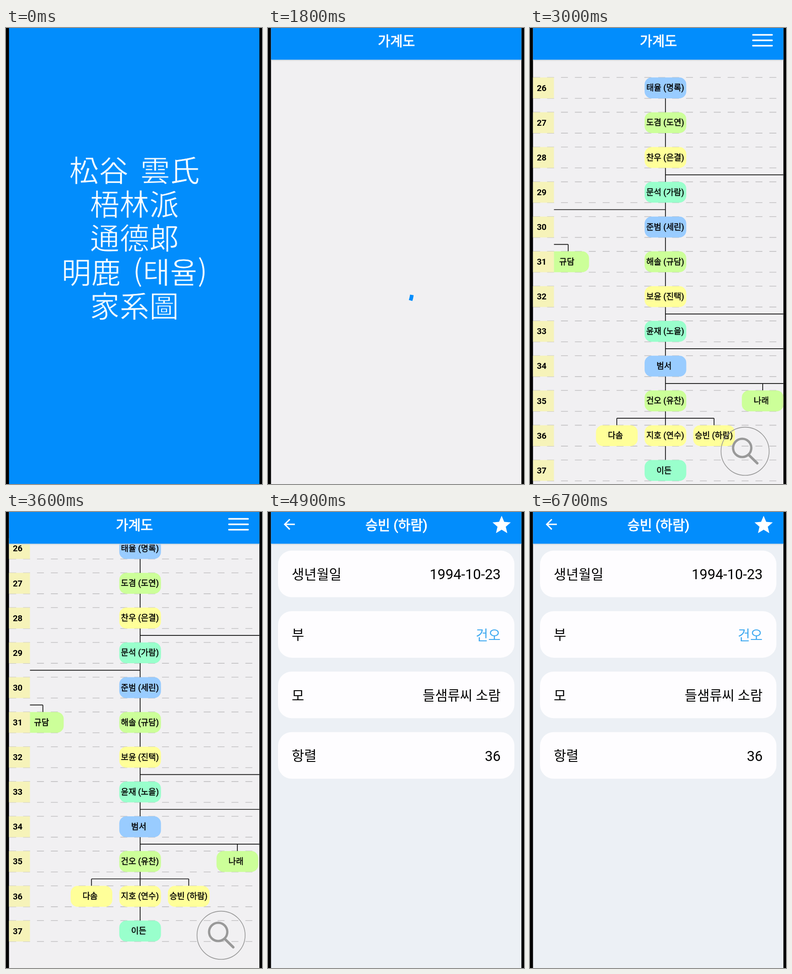
These frames come from a looping animation (561 by 998 pixels, 6.8 s). An HTML page:

```html
<!DOCTYPE html>
<html lang="ko">
<head>
<meta charset="utf-8">
<title>가계도</title>
<style>
html, body { margin: 0; width: 100%; height: 100%; overflow: hidden; background: #000; }
svg { display: block; width: 100vw; height: 100vh; }
text { font-family: Roboto, "Noto Sans CJK KR", "Noto Sans CJK", sans-serif; white-space: pre; }
.mid { text-anchor: middle; }
.end { text-anchor: end; }
/* Strokes tune the weight: background colour thins, text colour thickens */
.splash { font: 300 65px "Noto Sans CJK KR", "Noto Sans CJK", sans-serif; word-spacing: 8px;
  fill: #f6fcff; stroke: #028dfc; stroke-width: 0.9px; }
.bar { font-size: 29.5px; fill: #fff; stroke: #fff; stroke-width: 0.9px; }
.name { font-size: 18px; stroke: #000; stroke-width: 0.45px; }
.gen { font-size: 18.5px; font-weight: 700; }
.field { font-size: 29.6px; }
.num { font-size: 30.8px; }
</style>
</head>
<body>
<svg id="stage" viewBox="0 0 561 998" preserveAspectRatio="none"></svg>
<script>
const LOOP = 6800, BLUE = '#028dfc';
const DP = 548 / 360, ROW = 50 * DP, BOX_W = 60 * DP, BOX_H = 30 * DP, COL = 70 * DP;
const TOP = 108.3, CENTER = 296.8;
const FILLS = ['#99ccff', '#ccff99', '#ffff99', '#99ffcc'];

const rect = (x, y, w, h, fill, r = 0) =>
  `<rect x="${x}" y="${y}" width="${w}" height="${h}" rx="${r}" fill="${fill}"/>`;
const text = (x, y, str, cls, fill) =>
  `<text x="${x}" y="${y}" class="${cls}"${fill ? ` fill="${fill}"` : ''}>${str}</text>`;
const rowY = i => TOP + i * ROW;
const colX = c => CENTER + c * COL;

const header = title => rect(6, 69, 550, 4, 'url(#shadow)') +
  rect(6, -20, 550, 89.4, BLUE) + text(281.5, 38.5, title, 'bar mid');

// Each entry: generation index, column, label
const people = [
  [0, 0, '태율 (명록)'], [1, 0, '도겸 (도연)'], [2, 0, '찬우 (은결)'], [3, 0, '문석 (가람)'],
  [4, 0, '준범 (세린)'], [5, 0, '해솔 (규담)'], [6, 0, '보윤 (진택)'], [7, 0, '윤재 (노을)'],
  [8, 0, '범서'], [9, 0, '건오 (유찬)'], [10, 0, '지호 (연수)'], [11, 0, '이든'],
  [5, -2, '규담'], [9, 2, '나래'], [10, -1, '다솜'], [10, 1, '승빈 (하람)']
];
// Horizontal branches: generation above, first column, last column
const branches = [[2, 0, 4], [3, -4, 0], [4, -4, -2], [6, 0, 4], [7, 0, 4], [8, 0, 4], [9, -1, 1]];

function person([gen, col, label]) {
  const x = colX(col), y = rowY(gen);
  return rect(x - BOX_W / 2, y, BOX_W, BOX_H, FILLS[gen % 4], 10 * DP) +
    text(x - (label.length > 2 ? 0.5 : 3), y + 29, label, 'name mid');
}

function treeLines() {
  let d = `M${CENTER} ${rowY(0) + BOX_H}V${rowY(11)}`;
  for (const [gen, from, to] of branches)
    d += `M${colX(from)} ${rowY(gen + 1) - 10 * DP}H${colX(to)}`;
  for (const [gen, col] of people)
    if (col) d += `M${colX(col)} ${rowY(gen) - 10 * DP}V${rowY(gen)}`;
  return `<path d="${d}" fill="none" stroke="#111" stroke-width="1.7"/>`;
}

function dashes() {
  let d = '';
  for (let i = 0; i < 12; i++)
    for (const y of [rowY(i), rowY(i) + BOX_H]) d += `M7 ${y}H555`;
  return `<path d="${d}" stroke="#c3c2c4" stroke-width="1.6" stroke-dasharray="${10 * DP}"/>`;
}

const generations = Array.from({ length: 12 }, (_, i) =>
  rect(6, rowY(i), 46.5, BOX_H, '#f6f3b9') + text(15, rowY(i) + 29.3, 26 + i, 'gen')).join('');

const searchButton = `<g fill="none" stroke="#999">
  <circle cx="471.3" cy="926.3" r="52.7" stroke-width="1.6"/>
  <circle cx="465" cy="919" r="20" stroke-width="5"/>
  <path d="M479 934L498 952.5" stroke-width="5.5" stroke-linecap="round"/></g>`;
const menuIcon = `<path d="M488.5 15H530.5M488.5 27H530.5M488.5 38.7H530.5"
  stroke="#fff" stroke-width="3.4" stroke-linecap="round"/>`;
const backIcon = `<path transform="translate(28.4 8.8) scale(1.523)" fill="#fff"
  d="M20 11H7.83l5.59-5.59L12 4l-8 8 8 8 1.41-1.41L7.83 13H20z"/>`;
const starIcon = `<path transform="translate(488 4.2) scale(2)" fill="#fff"
  d="M12 17.27 18.18 21l-1.64-7.03L22 9.24l-7.19-.61L12 2 9.19 8.63 2 9.24l5.46 4.73L5.82 21z"/>`;

const fields = [['생년월일', '1994-10-23'], ['부', '건오', '#3fa9f0'], ['모', '들샘류씨 소람'], ['항렬', '36']];
const cards = fields.map(([label, value, color], i) => {
  const y = 84.5 + i * 132.4;
  return rect(22, y, 518, 102, '#fefdff', 30) + text(52, y + 62.5, label, 'field') +
    text(509.8, y + 62.8, value, (/\d/.test(value) ? 'num' : 'field') + ' end', color);
}).join('');

const splashLines = ['松谷 雲氏', '梧林派', '通德郞', '明鹿 (태율)', '家系圖'];

document.getElementById('stage').innerHTML = `
<defs>
  <linearGradient id="shadow" x2="0" y2="1">
    <stop stop-color="#cfd3d7"/><stop offset="1" stop-color="#cfd3d7" stop-opacity="0"/>
  </linearGradient>
  <clipPath id="screen"><rect x="6.6" width="548.7" height="998"/></clipPath>
  <clipPath id="chart"><rect x="52.5" width="510" height="1100"/></clipPath>
  <clipPath id="reveal"><rect id="revealBox" x="6" width="550" height="1200"/></clipPath>
</defs>
<rect width="561" height="998"/>
<g clip-path="url(#screen)">
  <g id="splash">${rect(6, 0, 550, 998, BLUE)}
    ${splashLines.map((s, i) => text(281.5, 336 + i * 74.2, s, 'splash mid')).join('')}</g>
  <g id="home">
    ${rect(6, -30, 550, 1080, '#f1f0f2')}
    <path id="spinner" fill="none" stroke="${BLUE}" stroke-width="8" stroke-linecap="square"/>
    <g id="tree">
      <g id="genColumn">${dashes()}${generations}</g>
      <g clip-path="url(#chart)"><g id="chartBody">${treeLines()}${people.map(person).join('')}</g></g>
      ${searchButton}
    </g>
    ${header('가계도')}
    <g id="menu">${menuIcon}</g>
  </g>
  <rect id="dim" x="6" width="550" height="998"/>
  <g clip-path="url(#reveal)"><g id="detail">
    ${rect(6, 0, 550, 1060, '#ecf0f5')}${cards}${header('승빈 (하람)')}${backIcon}${starIcon}
  </g></g>
</g>`;

const el = Object.fromEntries([...document.querySelectorAll('[id]')].map(n => [n.id, n]));
const show = (node, on) => node.setAttribute('display', on ? 'inline' : 'none');
const move = (node, x, y) => node.setAttribute('transform', `translate(${x} ${y})`);
const clamp = v => Math.max(0, Math.min(1, v));

// Cubic bezier (0.4, 0, 0.2, 1), solved by bisection
function ease(x) {
  x = clamp(x);
  let lo = 0, hi = 1;
  for (let i = 0; i < 20; i++) {
    const s = (lo + hi) / 2, r = 1 - s;
    if (1.2 * r * r * s + 0.6 * r * s * s + s * s * s < x) lo = s; else hi = s;
  }
  return lo * lo * (3 - 2 * lo);
}

function drawSpinner(t) {
  const cycle = (t - 1733) / 1333, f = cycle - Math.floor(cycle);
  const base = 94 + 0.162 * (t - 1800) + 90 * f;
  const from = base + 270 * ease(2 * f - 1), to = base + 270 * ease(2 * f) + 0.5;
  const point = deg => {
    const a = (deg - 90) * Math.PI / 180;
    return `${281 + 34 * Math.cos(a)} ${582.8 + 34 * Math.sin(a)}`;
  };
  el.spinner.setAttribute('d', `M${point(from)}A34 34 0 ${to - from > 180 ? 1 : 0} 1 ${point(to)}`);
}

function render(t) {
  const loaded = t >= 2000;
  show(el.splash, t < 400);
  show(el.home, t >= 400 && t < 4600);
  show(el.spinner, !loaded);
  show(el.tree, loaded);
  show(el.menu, loaded);
  drawSpinner(t);

  const scroll = ease((t - 3000) / 560);
  move(el.chartBody, -2.9 * scroll, -51.2 * scroll);
  move(el.genColumn, 0, -51.2 * scroll);

  const open = ease((t - 4153) / 425);
  move(el.home, 0, -21.8 * open);
  el.dim.setAttribute('opacity', 0.09 * clamp((t - 4170) / 117));
  show(el.detail, open > 0);
  move(el.detail, 0, 45.5 * (1 - open));
  el.revealBox.setAttribute('y', 958 * (1 - open));
}

const start = performance.now();
function tick() {
  render((performance.now() - start) % LOOP);
  requestAnimationFrame(tick);
}
render(0);
requestAnimationFrame(tick);
</script>
</body>
</html>
```
